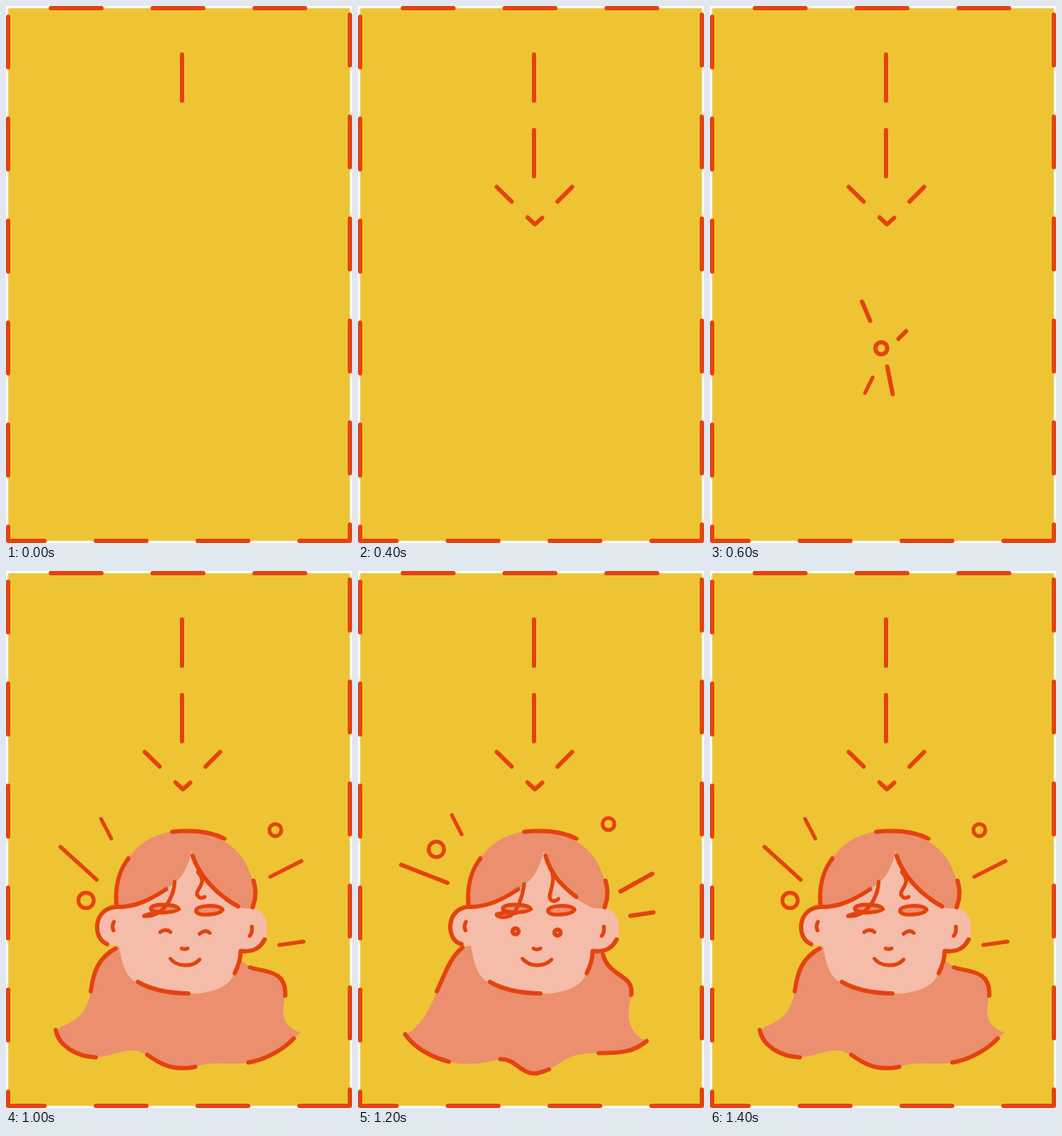
An HTML page for the animation above (1.6 s loop, 404 by 626 pixels).

```html
<!DOCTYPE html>
<html lang="en">
<head>
<meta charset="utf-8">
<title>Arrow and happy face</title>
<style>
  html, body { margin: 0; width: 100%; height: 100%; overflow: hidden; background: #fff; }
  svg { display: block; width: 404px; height: 626px; }
  .ink { fill: none; stroke: #e3430f; stroke-width: 5; stroke-linecap: round; stroke-linejoin: round; }
  .thin { stroke-width: 4.4; }
  .bg { fill: #eec434; }
  .hair { fill: #ec8f6e; }
  .skin { fill: #f5bcaa; }
  .border { stroke-dasharray: 59.2 59.7; stroke-dashoffset: 40.2; }

  .stem, .arrow, .burst, .head, .awake, .smile {
    visibility: hidden;
    animation: 1.6s step-end infinite;
  }
  .stem { animation-name: stem; }
  .arrow { animation-name: arrow; }
  .burst { animation-name: burst; }
  .head { animation-name: head; }
  .awake { animation-name: awake; }
  .smile { animation-name: smile; }

  @keyframes stem { 0% { visibility: hidden } 12.5%, 100% { visibility: visible } }
  @keyframes arrow { 0% { visibility: hidden } 25%, 100% { visibility: visible } }
  @keyframes burst { 0%, 50%, 100% { visibility: hidden } 37.5% { visibility: visible } }
  @keyframes head { 0% { visibility: hidden } 50%, 100% { visibility: visible } }
  @keyframes awake {
    0%, 62.5%, 87.5%, 100% { visibility: hidden }
    50%, 75% { visibility: visible }
  }
  @keyframes smile {
    0%, 75% { visibility: hidden }
    62.5%, 87.5%, 100% { visibility: visible }
  }
</style>
</head>
<body>
<svg viewBox="0 0 404 626">
  <rect class="bg" x="2.5" y="2.5" width="399" height="621"/>
  <path class="ink border" d="M401.5 623.5V2.5H2.5V623.5H401.5"/>

  <path class="ink" d="M205.5 56.5V110.5"/>
  <path class="ink stem" d="M205.5 144.5V198.5"/>
  <path class="ink arrow" d="M162 211L179.500 228M250 211L233 228M198 246.500L206.500 254.500L215 247"/>

  <g class="ink burst">
    <circle cx="200" cy="399" r="7"/>
    <path d="M177.500 344.500L187 367M229 379L220 388M207 420.500L213.300 452.500"/>
    <path class="thin" d="M190 433L181 451"/>
  </g>

  <!-- long hair -->
  <path class="hair awake" d="M122 439C108 450 103 466 92 490C84 511 72 533 55 540C66 556 84 566 106 572C128 577 146 574 166 569C184 568 191 588 209 585.500C216 584 219 583 223 581C241 572 246 561 281 562C305 562 322 561 337 548C322 542 315 529 316 513C316 504 319 501 319 494C323 470 293 474 286 447L275 440L200 420Z"/>
  <path class="hair smile" d="M128 440C108 451 102 467 99 490C93 523 76 525 58 535C61 553 82 566 105 567C130 565 143 552 165 564C182 576 196 583 221 578C246 570 259 577 283 573C304 569 321 560 336 545L344 538C321 531 322 515 326 495C328 464 301 468 285 462L275 454L200 420Z"/>

  <!-- face and ears -->
  <path class="skin head" d="M131 391C103 391 100 429 119 436L132 437C136 466 144 476 154 480C170 488 190 492 213 492.500C242 493 261 484 267 469C273 457 273 449 274 443C288 444 297 439 302 430C309 413 303 395 289 393L270 350L217 318L150 360Z"/>
  <path class="hair head" d="M129 391C126 347 151 303 208 303C263 303 297 344 288 393C281 394 276 394 270 391C245 377 226 361 217 326C211 351 203 361 187 371C171 381 152 392 129 391Z"/>

  <g class="ink head">
    <path d="M129 390C127 369 132 349 143 335M194 304Q231 300 255 312M289 361Q294 377 288 392"/>
    <path d="M154 479C169 488 192 492 213 492.500M302 429.500C296 441 288 444 274 443Q274 455 267 469"/>
    <path class="thin" d="M126 409Q123 414 125.500 419M287 414.500Q288 422 284.500 425.500"/>
  </g>

  <g class="ink awake">
    <path d="M121 435C101 430 103 391 131 391.500C152 392 170 382 187 371M219 332C225 354 239 368 255 380"/>
    <path d="M122 439C108 450 103 466 92 490M55 540C66 556 84 566 106 572M166 569C184 568 191 588 209 585.500Q216 584 223 581M281 562C305 562 322 561 337 548M286 447C293 474 323 470 319 494"/>
    <path d="M50.500 342.500L104.500 363.500M306.500 373.500L343.500 353M318 402L345 398"/>
    <path class="thin" d="M109.500 284.500L121 307"/>
    <g class="thin">
      <circle cx="91.500" cy="324.500" r="9"/>
      <circle cx="292.500" cy="295" r="7"/>
      <path class="hair" d="M202 394C198 399 169 400 169 393C171 387 199 388 202 394ZM253 395C249 401 224 403 222 397C220 389 250 388 253 395Z"/>
      <path d="M194 365C192 381 186 396 178 402C170 405 161 403 162 400Q171 397 184 399M227 353C231 366 219 380 226 384Q231 386 234 382"/>
      <path d="M205 440Q209 442.500 213 440M192 452C201 462 217 462 226 453"/>
    </g>
    <circle cx="184" cy="420" r="3.500"/>
    <circle cx="233" cy="421.500" r="3.500"/>
  </g>

  <g class="ink smile">
    <path d="M118 435C100 428 102 392 130 391.500C152 392 170 382 187 371M218 332C225 354 245 377 271 391"/>
    <path d="M128 440C108 451 102 467 99 490M58 535C61 553 82 566 105 567M165 564C182 576 196 583 221 578M283 573C304 569 321 560 336 545M285 462C301 468 328 464 326 495"/>
    <path class="thin" d="M111 289L123 312M63.500 321.500L106 360M308.500 356.500L345 338M319 436L347.500 432"/>
    <g class="thin">
      <circle cx="93.500" cy="384" r="9"/>
      <circle cx="314.500" cy="302" r="7"/>
      <path class="hair" d="M202 394C198 399 169 400 169 393C171 387 199 388 202 394ZM253 395C249 401 224 403 222 397C220 389 250 388 253 395Z"/>
      <path d="M197 362C196 379 187 393 177 399Q169 403 161 402Q171 398 186 398M224 351C236 364 222 370 223 377Q226 383 232 380"/>
      <path d="M180 421Q187 416 192 421M226 423Q233 417 238 422M205 440Q209 441.500 212 440M192 452C200 462 218 462 226 453"/>
    </g>
  </g>
</svg>
</body>
</html>
```
